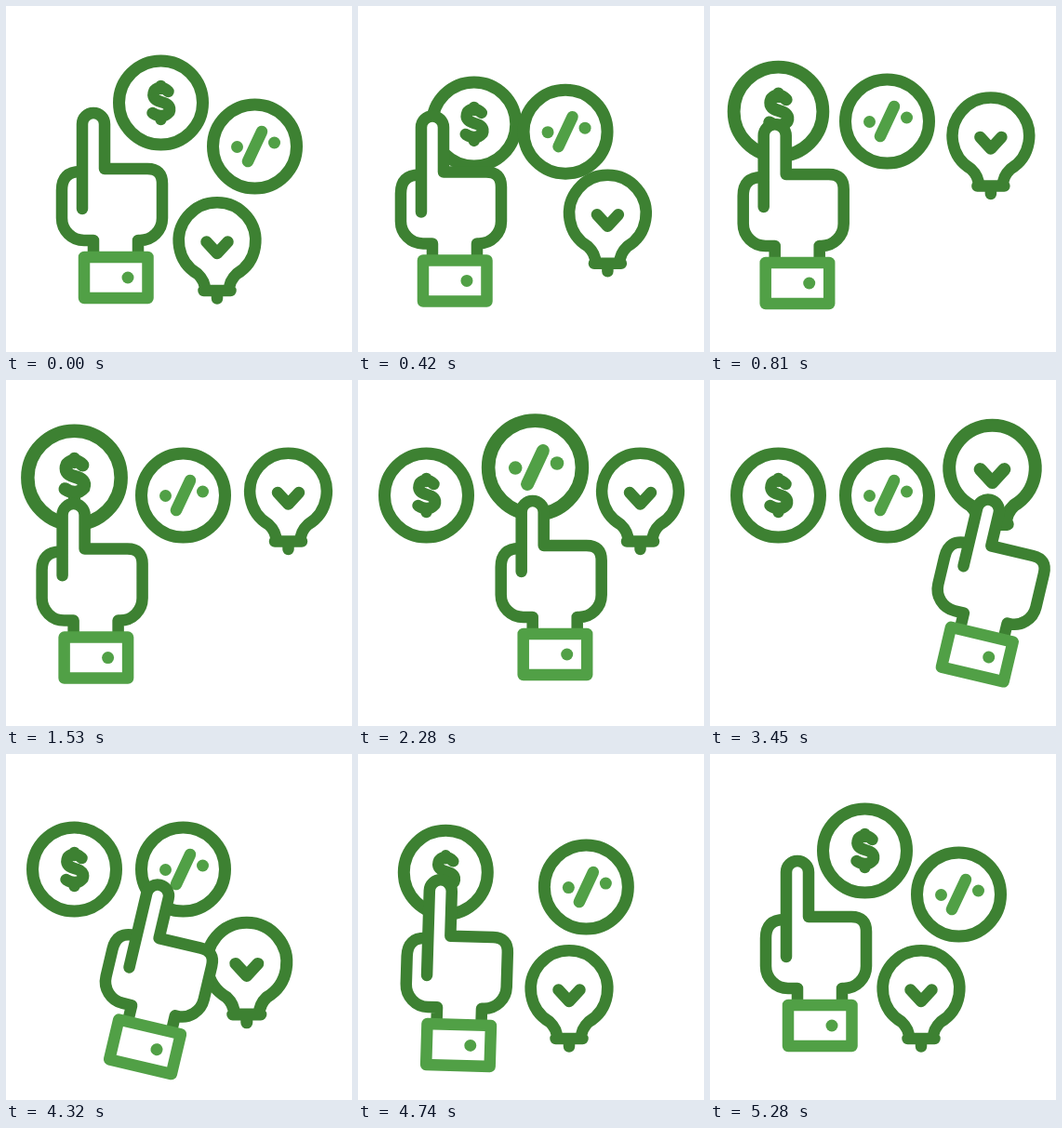
An HTML page for the animation above (5.4 s loop, 372 by 372 pixels).

```html
<!DOCTYPE html>
<html lang="en">
<head>
<meta charset="utf-8">
<title>Choosing an option</title>
<style>
  html, body { margin: 0; width: 100%; height: 100%; overflow: hidden; background: #fff; }
  svg { display: block; width: 100%; height: 100%; }
  g { fill: none; stroke: #3d8132; stroke-width: 12.5; stroke-linecap: round; stroke-linejoin: round; }
  .light { stroke: #51a046; }
  .dot { fill: #51a046; stroke: none; }
  .solid { fill: #fff; }
</style>
</head>
<body>
<svg viewBox="0 0 372 372">
  <g id="dollar">
    <circle r="45" stroke-width="13"/>
    <path d="M8-12Q0-20-7-13Q-11-4 0-1Q12 2 9 10Q2 18-9 11M0-18V-15M0 18V15"/>
  </g>
  <g id="percent">
    <circle r="45" stroke-width="13"/>
    <path class="light" d="M-7.5 16L7.5-16"/>
    <circle class="dot" cx="-19" cy=".5" r="6.5"/>
    <circle class="dot" cx="21" cy="-4" r="6.5"/>
  </g>
  <g id="balloon">
    <path d="M-13 53Q-13 43-21 35.5A41.3 41.3 0 1 1 21 35.5Q13 43 13 53M-14.5 53.5H14.5M0 53.5V62"/>
    <path d="M-11.5 1L0 13.5L11.5 1"/>
  </g>
  <g id="hand">
    <path fill="#fff" stroke="none" d="M82 178L94 264H142V178Z"/>
    <path class="solid" d="M94 264V252H84A24 24 0 0 1 60 228V198Q60 178 80 178"/>
    <path class="solid" id="finger"/>
    <rect class="solid light" x="84" y="270" width="68.5" height="44"/>
    <circle class="dot" cx="131" cy="292" r="6.5"/>
  </g>
</svg>
<script>
const LOOP = 5400, PRESS = 410;
const el = id => document.getElementById(id);

// Eased progress from 0 to 1, quicker at the start than at the end.
function go(t, start, duration) {
  const u = Math.min(1, Math.max(0, (t - start) / duration)) ** 0.8;
  return u * u * (3 - 2 * u);
}

// Rises to 1 and falls back to 0.
const hop = (t, start, duration) =>
  go(t, start, duration * 0.57) - go(t, start + duration * 0.57, duration * 0.43);

const curve = (a, b, c, u) =>
  a.map((v, i) => v * (1 - u) ** 2 + 2 * b[i] * u * (1 - u) + c[i] * u * u);

const items = [
  { id: 'dollar', home: [166.5, 104], via: [140, 138], row: [73.5, 124],
    enter: 590, leave: 4620, exit: 660, press: 630, release: 1500, relax: PRESS, lift: 20 },
  { id: 'percent', home: [267.5, 151], via: [229, 137], row: [190.5, 124],
    enter: 570, leave: 4330, exit: 710, press: 1860, release: 2700, relax: PRESS, lift: 30 },
  { id: 'balloon', home: [227, 252.5], via: [299, 222], row: [303.5, 120],
    enter: 870, leave: 3900, exit: 690, press: 3030, release: 3900, relax: 780, lift: 25 },
];

// Moves an item between home and row, lifted and enlarged while pressed.
function drawItem(t, item) {
  const along = go(t, 150, item.enter) - go(t, item.leave, item.exit);
  const pressed = go(t, item.press, PRESS) - go(t, item.release, item.relax);
  const [x, y] = curve(item.home, item.via, item.row, along);
  el(item.id).setAttribute('transform',
    `translate(${x} ${y - item.lift * pressed}) scale(${1 + 0.12 * pressed})`);
  return pressed;
}

function drawHand(t, bend) {
  const first = go(t, 150, 570), second = go(t, 1500, 600);
  const third = go(t, 2700, 600), back = go(t, 3900, 690);
  const x = -24.3 * first + 118 * second + 75 * third - 183.7 * back + 15 * go(t, 4590, 510);
  const y = 6 * first - 3 * second + 3 * third - 6 * back
    + 17 * hop(t, 1500, 780) + 30 * hop(t, 2700, 750) + 32 * hop(t, 3900, 1200);
  const turn = 13.3 * (go(t, 2700, 570) - go(t, 4320, 580));
  el('hand').setAttribute('transform', `translate(${x} ${y}) rotate(${turn} 131 292)`);
  el('finger').setAttribute('d',
    `M82 ${218 - 15 * bend}V${127 + 12 * bend}a12 12 0 0 1 24 0V175` +
    'H152Q168 175 168 191V228A24 24 0 0 1 144 252H142V264');
}

function frame() {
  const t = performance.now() % LOOP;
  drawHand(t, Math.max(...items.map(item => drawItem(t, item))));
  requestAnimationFrame(frame);
}
frame();
</script>
</body>
</html>
```
